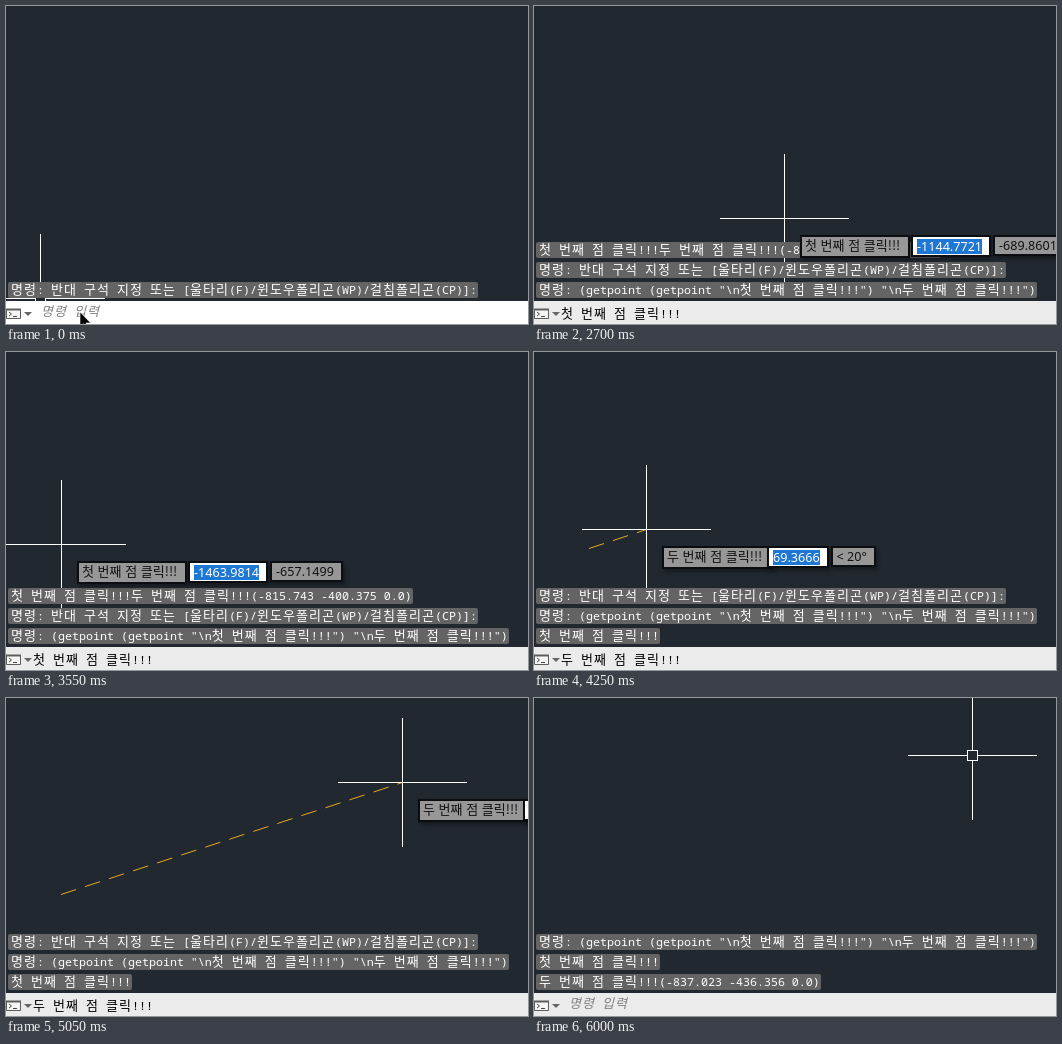
Write an HTML page that moves like this. It is 522x318 px and loops after 6500 ms.

```html
<!DOCTYPE html>
<html lang="ko">
<head>
<meta charset="utf-8">
<title>getpoint</title>
<style>
  html, body { margin: 0; width: 100%; height: 100%; overflow: hidden; background: #212830; }
  #stage { position: relative; width: 522px; height: 318px; overflow: hidden; background: #212830; }
  #stage > *, #tip > *, #bar > * { position: absolute; }
  svg { left: 0; top: 0; }
  #cross { fill: none; stroke: #fff; shape-rendering: crispEdges; }
  #rubber { stroke: #e8a91c; stroke-dasharray: 15.8 9.5; }

  .mono { font: 11.667px/15px "Noto Sans Mono", "DejaVu Sans Mono", monospace; white-space: pre; }
  /* Hangul advances .92em; the spacing fills the cell to a full em */
  .mono b { font: 13px/0 "Noto Sans CJK KR", "Noto Sans CJK", sans-serif; letter-spacing: .08em; }
  .row { left: 2px; padding: 0 1px 1px 3px; border-radius: 2px; background: #646464; color: #fff; }
  .row:empty { display: none; }

  #bar { left: 0; top: 295px; width: 522px; height: 23px; }
  #input { top: 5px; color: #000; }
  #hint { left: 35px; top: 3px; color: #808080; font-style: italic; }
  #hint b { font-style: italic; }
  #caret { top: 6px; width: 1px; height: 15px; background: #000; }

  #tip { left: 0; top: 0; color: #111; white-space: pre; }
  .box { box-sizing: border-box; border: 2px solid #0b0d10; background: #979797; box-shadow: 2px 3px 4px rgba(0, 0, 0, .35); }
  #label { left: 16px; top: 17px; width: 110px; height: 23px; padding-left: 3px;
           font: 13px/15px "Noto Sans CJK KR", "Noto Sans CJK", sans-serif; }
  #fields { top: 17px; display: flex; gap: 2px; font: 12.6px/17px "Noto Sans", "Open Sans", sans-serif; }
  #first { height: 22px; padding: 2px 7px 0 4px; background: #fff; line-height: 15px; }
  #first span { display: block; background: #1f77d4; color: #fff; }
  #second { height: 21px; padding: 0 7px 0 4px; }
</style>
</head>
<body>
<div id="stage">
  <svg width="522" height="318">
    <line id="rubber"/>
    <path id="cross"/>
  </svg>
  <div class="row mono" style="top:236px"></div>
  <div class="row mono" style="top:256px"></div>
  <div class="row mono" style="top:276px"></div>
  <div id="bar">
    <svg width="30" height="23">
      <path d="M.5 8.5h14v9h-14z" fill="#f6f6f6" stroke="#5c5c5c"/>
      <path d="M0 8.5h15" stroke="#5c5c5c" stroke-width="2"/>
      <path d="M3 11l2.5 2L3 15M7 15.5h4" fill="none" stroke="#444"/>
      <path d="M18 11h8l-4 4z" fill="#666"/>
    </svg>
    <div id="input" class="mono"></div>
    <div id="hint" class="mono"></div>
    <div id="caret"></div>
  </div>
  <div id="tip">
    <div id="label" class="box"></div>
    <div id="fields">
      <div id="first" class="box"><span></span></div>
      <div id="second" class="box"></div>
    </div>
  </div>
  <svg width="522" height="318">
    <path id="arrow" d="M74 306v15l3.5-3.3 2.6 6 2.4-1-2.6-5.7h4.8z" fill="#000" stroke="#fff" stroke-width=".6"/>
    <path id="beam" d="M72 301.5h2.5l1 1 1-1H79M75.5 302v13M72 315.5h2.5l1-1 1 1H79" fill="none" stroke="#222"/>
  </svg>
</div>
<script>
const LOOP = 6500, STEP = 50;
const CLICK_BAR = 50, PASTE = 450, ENTER = 1950, MOVE = 2400, PICK1 = 3800, PICK2 = 5850;
const START = { x: 55, y: 196 };
const SCALE = { x: 1.636971, y: 1.635508 };

const ASK1 = '첫 번째 점 클릭!!!', ASK2 = '두 번째 점 클릭!!!';
const CODE = `(getpoint (getpoint "\\n${ASK1}") "\\n${ASK2}")`;
const LOG = [
  `${ASK1}${ASK2}(-815.743 -400.375 0.0)`,
  '명령: 반대 구석 지정 또는 [울타리(F)/윈도우폴리곤(WP)/걸침폴리곤(CP)]:',
  '명령: ' + CODE,
  ASK1,
  ASK2 + '(-837.023 -436.356 0.0)'
];

// time, x, y of the crosshair
const PATH = [
  [2400, 90, 265], [2550, 160, 240], [2700, 250, 212], [2850, 290, 188], [2950, 262, 170],
  [3050, 202, 162], [3100, 125, 162], [3150, 62, 166], [3350, 54, 180], [3550, 55, 192],
  [3750, 55, 196], [3900, 56, 195.7], [4100, 70, 191], [4200, 94.8206, 181.51], [4250, 112, 177],
  [4450, 267, 136], [4600, 325, 110], [4800, 368, 96], [5050, 396, 84], [5150, 407, 73],
  [5400, 428, 62], [5700, 438, 57]
];
const PLAIN = 'M-64 .5H65M.5-64V65';
const PICKBOX = 'M-64 .5H-5M6 .5H65M.5-64V-5M.5 6V65M-4.5-4.5h10v10h-10z';

const $ = id => document.getElementById(id);
const rows = document.querySelectorAll('.row');
const value = document.querySelector('#first span');
const show = (el, on) => { el.style.display = on ? '' : 'none'; };

function setText(el, text) {
  if (el.text === text) return;
  el.text = text;
  el.innerHTML = text.replace(/[가-힣]+/g, '<b>$&</b>');
}

function pointer(t) {
  if (t < MOVE) return { x: 34, y: 292 };
  const i = PATH.findIndex(p => p[0] > t);
  if (i < 0) return { x: 438, y: 57 };
  const [t0, x0, y0] = PATH[i - 1], [t1, x1, y1] = PATH[i];
  const k = (t - t0) / (t1 - t0);
  return { x: x0 + (x1 - x0) * k, y: y0 + (y1 - y0) * k };
}

function drawTip(t, p, x, y) {
  const second = t >= PICK1;
  $('tip').style.transform = `translate(${x}px,${y}px)`;
  $('label').textContent = second ? ASK2 : ASK1;
  $('fields').style.left = (second ? 121 : 127) + 'px';
  if (second) {
    // the polar readout trails the pointer by one step
    const q = pointer(t - STEP), dx = q.x - START.x, dy = START.y - q.y;
    value.textContent = (Math.hypot(dx, dy) * SCALE.x).toFixed(4);
    $('second').textContent = `< ${Math.round(Math.atan2(dy, dx) * 180 / Math.PI)}°`;
  } else {
    value.textContent = (-1452.5226 + (p.x - 62) * SCALE.x).toFixed(4);
    $('second').textContent = (-614.6267 - (p.y - 166) * SCALE.y).toFixed(4);
  }
}

function drawLog(t) {
  const last = t < ENTER ? 1 : t < PICK1 ? 2 : t < PICK2 ? 3 : 4;
  rows.forEach((row, i) => {
    setText(row, t < ENTER && i < 2 ? '' : LOG[last - 2 + i]);
  });
}

function drawBar(t) {
  const idle = t < CLICK_BAR || t >= PICK2;
  const typed = t >= PASTE && t < ENTER;
  $('bar').style.background = t < MOVE ? '#fff' : '#ebebeb';
  setText($('hint'), idle ? '명령 입력' : '');
  setText($('input'), idle || t < PASTE ? '' : typed ? CODE : t < PICK1 ? ASK1 : ASK2);
  $('input').style.left = (typed ? 29 : 27) + 'px';
  const lit = t < 950 || t >= 1450;
  show($('caret'), t >= CLICK_BAR && t < ENTER && lit);
  $('caret').style.left = (typed ? 486 : 29) + 'px';
  show($('arrow'), t < CLICK_BAR);
  show($('beam'), t >= CLICK_BAR && t < MOVE);
}

function draw(t) {
  const p = pointer(t), x = Math.round(p.x), y = Math.round(p.y);
  const idle = t < CLICK_BAR || t >= PICK2;
  $('cross').setAttribute('d', idle ? PICKBOX : PLAIN);
  $('cross').setAttribute('transform', `translate(${x} ${y})`);

  const line = { x1: START.x, y1: START.y + .5, x2: x + .5, y2: y + .5 };
  for (const k in line) $('rubber').setAttribute(k, line[k]);
  show($('rubber'), t >= PICK1 && t < PICK2);

  const asking = t >= MOVE && t < PICK2;
  show($('tip'), asking);
  if (asking) drawTip(t, p, x, y);
  drawLog(t);
  drawBar(t);
}

function tick() {
  const t = performance.now() % LOOP;
  draw(Math.floor(t / STEP) * STEP);
  requestAnimationFrame(tick);
}
tick();
</script>
</body>
</html>
```
